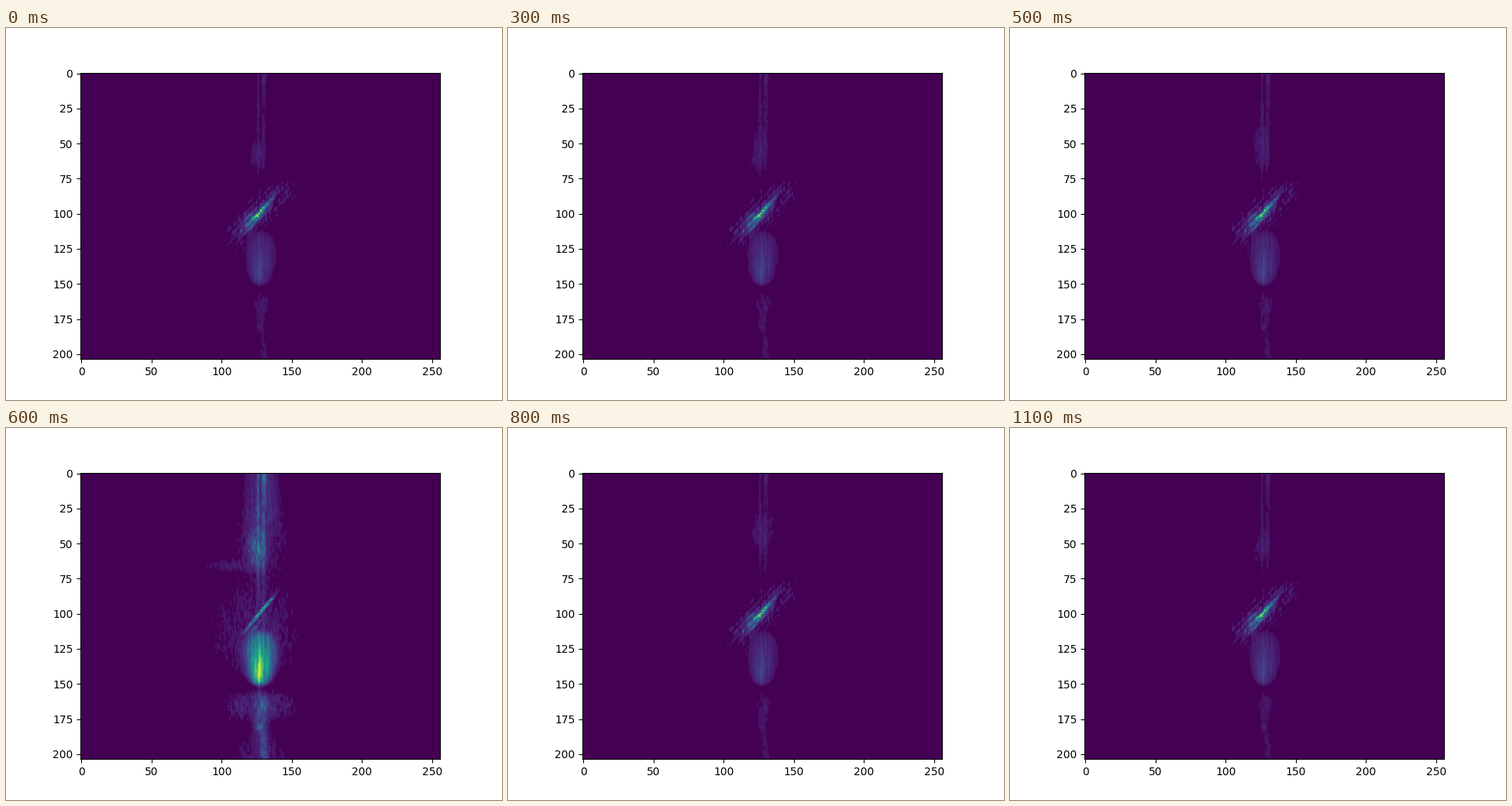
A matplotlib script that plays this animation: 640x480 px, repeating every 1.2 s.

```python
import matplotlib as mpl
import matplotlib.pyplot as plt
import numpy as np
from matplotlib.animation import FuncAnimation
from matplotlib.colors import ListedColormap

ROWS, COLS, FRAMES, BURST = 204, 256, 12, 6
R, C = np.mgrid[:ROWS, :COLS].astype(float)


def gauss(x, mid, width, power=2):
    return np.exp(-np.abs((x - mid) / width) ** power)


def band(lo, hi, soft=1.5):
    return 1 / (1 + np.exp((lo - R) / soft)) / (1 + np.exp((R - hi) / soft))


def grain(seed, dr, dc, length, contrast):
    """Speckle with mean 1, smeared along one direction."""
    noise = np.random.default_rng(seed).rayleigh(size=(ROWS, COLS))
    g = sum(np.roll(noise, (round(k * dr), round(k * dc)), (0, 1))
            for k in range(length))
    return np.clip(1 + contrast * (g - g.mean()) / g.std(), 0, None)


def rotated(dc, dr, c0, r0):
    """Coordinates along and across a line through (c0, r0)."""
    return ((C - c0) * dc + (R - r0) * dr,
            (C - c0) * -dr + (R - r0) * dc)


LONG = grain(1, 1, 0, 24, 0.16)
SHORT = grain(3, 1, 0, 4, 0.5)
DIAG = grain(2, -0.69, 0.72, 4, 0.3)

# (column, row, brightness) of the hottest cells on the streak
SPARKS = [(128, 98, 1), (126, 102, 0.95), (130, 96, 0.9),
          (127, 100, 0.9), (124, 103, 0.7)]


def make_streak():
    u, w = rotated(0.7, -0.714, 126, 100)
    fringes = 1 + 0.45 * np.cos(2 * np.pi * w / 3.4)
    halo = 0.055 * gauss(u, 0, 33, 4) * gauss(w, 0, 11) * fringes * SHORT
    lobe = 0.24 * gauss(u, -7, 9) * gauss(w, 0, 4.2) * fringes
    cu, cw = rotated(0.64, -0.77, 127.5, 99.5)
    core = 0.42 * gauss(cu, 1, 11) * gauss(cw, 0, 1.7)
    sparks = np.max([a * gauss(C, c, 0.65) * gauss(R, r, 0.65)
                     for c, r, a in SPARKS], axis=0)
    thin = 0.5 * gauss(cu, -1, 17, 4) * gauss(cw, 0, 1.2)
    fringe = 0.3 * gauss(cu, -11, 8) * gauss(cw, 4, 1.2)
    wide = np.maximum(halo + (lobe + core) * DIAG, sparks)
    return wide, np.maximum((thin + fringe) * DIAG, 0.8 * sparks)


def make_blob():
    width = 10.5 * np.sqrt(np.clip(1 - ((R - 129) / 24) ** 2, 0.04, 1))
    sides = gauss(C, 127.5, width, 3) * band(112, 150.5, 1) * band(114, 220, 3)
    heart = 0.075 * gauss(R, 143, 12) * gauss(C, 127, 5)
    seam = 0.03 * gauss(C, 127, 0.8)
    return sides * (0.09 + heart + seam)


def make_column():
    lines = gauss(C, 126, 1) + gauss(C, 130, 1.3)
    top = 0.036 * lines * band(-9, 66, 5) + 0.02 * lines * band(60, 112, 5)
    top += 0.04 * gauss(R, 0, 8) * gauss(C, 130, 2.5)
    top += 0.025 * gauss(C, 129, 12, 3) * band(-9, 40, 5)
    low = 0.04 * gauss(C, 128, 5) * band(157, 185)
    low += 0.05 * gauss(C, 127, 2) * gauss(R, 181, 1.5)
    low += 0.045 * gauss(C, 130, 3) * band(188, 210, 3)
    return top + low


def make_haze():
    return (0.01 * gauss(R, 66, 4) * gauss(C, 108, 23, 4)
            + 0.014 * gauss(R, 113, 32, 3) * gauss(C, 124, 32)
            + 0.012 * gauss(R, 52, 24) * gauss(C, 128, 24)
            + 0.02 * band(158, 174, 2.5) * gauss(C, 127, 25, 4)
            + 0.012 * band(184, 212) * gauss(C, 128, 7 + np.abs(R - 183)))


STREAK, THIN = make_streak()
BLOB, COLUMN, HAZE = make_blob(), make_column(), make_haze()

# Drift of the bulge on the upper column
KEYS = [0, 2, 4, 6, 7, 9, 11]
ROW = [57, 58, 52, 53, 38, 49, 52]
COL = [125, 123, 126, 125, 129, 127, 126]
TALL = [10, 10, 20, 12, 15, 9, 10]
WIDE = [5.5, 5, 6, 6, 9, 7, 6]
SLANT = [0, 0.25, 0, 0, 0, 0, 0.25]


def scene(i):
    row, col, tall, wide, slant = (
        np.interp(i, KEYS, v) for v in (ROW, COL, TALL, WIDE, SLANT))
    bulge = 0.045 * gauss(R, row, tall) * gauss(C, col - slant * (R - row), wide)
    fine = 0.6 * SHORT + 0.4 * grain(20 + i, 1, 0, 3, 0.5)
    still = (BLOB * LONG + (COLUMN + bulge) * (0.6 * LONG + 0.4 * fine)
             + HAZE * fine)
    if i == BURST:
        return np.maximum(4.5 * still, THIN)
    return np.maximum(still, STREAK * (0.8 + 0.2 * fine))


shades = mpl.colormaps["viridis"](np.arange(256))
shades[:10] = shades[0]
cmap = ListedColormap(shades)

frames = [scene(i) for i in range(FRAMES)]
fig, ax = plt.subplots(figsize=(6.4, 4.8), dpi=100)
image = ax.imshow(frames[0], cmap=cmap, vmin=0, vmax=1)


def update(i):
    image.set_data(frames[i])
    return [image]


anim = FuncAnimation(fig, update, frames=FRAMES, interval=100, repeat=True)
plt.show()
```
